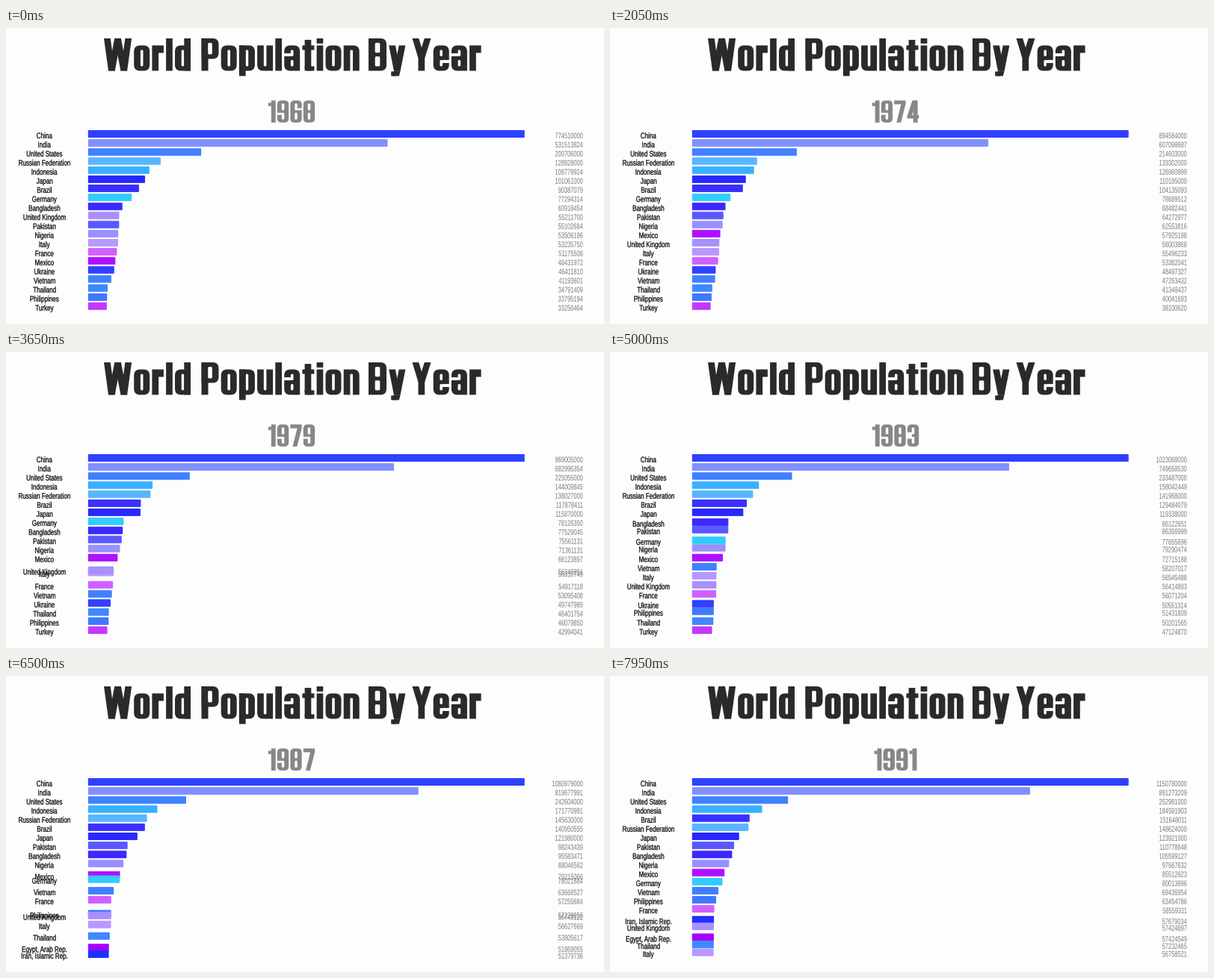
Animation of 800 by 397 pixels, one loop 8 s. Source, as a matplotlib script:

```python
import numpy as np
import matplotlib.pyplot as plt
from matplotlib.animation import FuncAnimation
from matplotlib.patches import PathPatch
from matplotlib.path import Path
from matplotlib.textpath import TextPath
from matplotlib.transforms import Affine2D

WIDTH, HEIGHT, DPI = 800, 397, 100
STEP, FRAMES = 50, 160
TICK, EASE = 351, 305              # ms per year, ms of movement in it
YEARS, ROWS = np.arange(1968, 1992), 20
BAR_X, BAR_Y, BAR_W, BAR_H, PITCH = 109.8, 137, 584, 10.1, 12.16
PAPER, DARK, GREY = "#fdfdfe", "#2a2a2a", "#878787"

fig = plt.figure(figsize=(WIDTH / DPI, HEIGHT / DPI), dpi=DPI, facecolor=PAPER)
ax = fig.add_axes([0, 0, 1, 1])
ax.set(xlim=(0, WIDTH), ylim=(HEIGHT, 0))
ax.axis("off")


# ---------- shapes ----------
def slab(x0, y0, x1, y1, r=0):
    """Rectangle with corner radii (top left, top right, bottom right, bottom left)."""
    a, b, c, d = r if isinstance(r, tuple) else (r,) * 4
    pts = [(x0, y1 - a), (x0, y1), (x0 + a, y1),
           (x1 - b, y1), (x1, y1), (x1, y1 - b),
           (x1, y0 + c), (x1, y0), (x1 - c, y0),
           (x0 + d, y0), (x0, y0), (x0, y0 + d), (x0, y1 - a)]
    corner = [Path.LINETO, Path.CURVE3, Path.CURVE3]
    codes = [Path.MOVETO] + corner[1:] + corner * 3 + [Path.CLOSEPOLY]
    return Path(pts, codes)


def add(path, color, edge=0):
    return ax.add_patch(PathPatch(path, fc=color, ec=color, lw=edge))


# ---------- heavy condensed lettering ----------
C, X, D = 43.5, 34, -7             # cap height, x-height, descender
S, W, N = 8.7, 21, 22.5            # stem, letter width, numeral width
T, GAP = 6, 3.2                    # thickness of the bows, letter spacing


def ink(*args):
    return slab(*args), True


def cut(*args):
    return slab(*args), False


def slant(x0, y0, x1, y1, s=S):
    pts = [(x0, y0), (x0 + s, y0), (x1 + s, y1), (x1, y1), (x0, y0)]
    return Path(pts, closed=True), True


def bowl(w, h, segs, square="", y0=0, gap=4):
    """Rounded block opened up like a seven-segment figure.

    a top, b/c right, d bottom, e/f left, g middle; square lists unrounded corners.
    """
    mid, half = y0 + h / 2, 2.5
    low = y0 + T if "d" in segs else y0 - 1
    high = y0 + h - T if "a" in segs else y0 + h + 1
    radii = tuple(8 * (bow in segs and str(i) not in square) for i, bow in enumerate("aadd"))
    holes = [(low, mid - half), (mid + half, high)] if "g" in segs else [(low, high)]
    parts = [ink(0, y0, w, y0 + h, radii)]
    parts += [cut(S, b, w - S, t, 1.7) for b, t in holes]
    for upper, lower, x in (("f", "e", -1), ("b", "c", w - S - .3)):
        top = mid + half + gap if upper not in segs else mid - half
        bottom = mid - half - gap if lower not in segs else mid + half
        if top > bottom:
            parts.append(cut(x, bottom, x + S + 1.3, top))
    return parts


def zigzag(xs, s=S):
    ends = [C, 0] * len(xs)
    return [slant(p, ends[i], q, ends[i + 1], s) for i, (p, q) in enumerate(zip(xs, xs[1:]))]


GLYPHS = {
    "W": (37, zigzag([0, 6, 14.2, 22.4, 28.4])),
    "P": (23, [ink(0, 0, 9, C)] + bowl(23, C - 16, "abcdef", "03", 16)),
    "B": (24, bowl(24, C, "abcdefg", "03")),
    "Y": (25, [slant(0, C, 8, 17), slant(16.3, C, 8, 17), ink(8, 0, 8 + S, 18)]),
    "o": (W, bowl(W, X, "abcdef")),
    "n": (W, bowl(W, X, "abcef", "03")),
    "u": (W, bowl(W, X, "bcdef", "12")),
    "d": (W, bowl(W, X, "abcdef", "12") + [ink(W - S, 0, W, C)]),
    "p": (W, bowl(W, X, "abcdef", "03") + [ink(0, D, S, X)]),
    "a": (W, bowl(W, X, "abcdeg", "2")),
    "e": (W, bowl(W, X, "abdefg")),
    "l": (S, [ink(0, 0, S, C)]),
    "i": (S, [ink(0, 0, S, X), ink(0, X + 2.6, S, C)]),
    "r": (15.5, [ink(0, 0, S, X), ink(S - 1, X - 10, 15.5, X)]),
    "t": (16, [ink(3.2, 0, 3.2 + S, C - 2), ink(0, X - T, 16, X),
               ink(3.2, 0, 16, T, (0, 0, 0, 5))]),
    "y": (22, [slant(0, X, 6.7, 0), slant(13.5, X, 6.7, 0), slant(6.7, 0, 5, D),
               ink(3, D, 10, -1)]),
    "1": (14.5, [ink(5.8, 0, 14.5, C), ink(0, C - 11, 6, C - 4.5)]),
    "4": (23, [ink(11.8, 0, 11.8 + S, C), ink(0, 8, 23, 14.5), slant(0, 13, 10, C)]),
    "7": (N, [ink(0, C - 7.5, N, C), slant(4.5, 0, N - S, C - 7)]),
    "5": (N, bowl(N, C, "acdfg", "01", gap=10)),
}
for digit, segs in zip("023689", "abcdef abdeg abcdg acdefg abcdefg abcdfg".split()):
    GLYPHS[digit] = N, bowl(N, C, segs)


def span(text):
    return sum(GLYPHS[c][0] + GAP for c in text) - GAP


def letter(text, x, base, color, size=1.0):
    patches = []
    for c in text:
        w, parts = GLYPHS[c]
        place = Affine2D().scale(size, -size).translate(x, base)
        patches += [add(p.transformed(place), color if solid else PAPER) for p, solid in parts]
        x += (w + GAP) * size
    return patches


# ---------- small condensed text ----------
def small_text(text, x, align, condense):
    path = TextPath((0, 0), text, size=10.8, prop={"family": "Liberation Sans"})
    path = path.transformed(Affine2D().scale(condense, -1))
    box = path.get_extents()
    return path.transformed(Affine2D().translate(x - box.x0 - align * box.width, 0))


def shifted(path, y):
    return Path(path.vertices + [0, y], path.codes)


# ---------- data: a cubic through four census years ----------
CENSUS = np.array([1968, 1979, 1985, 1991])


def growth(points):
    cubic = np.polyfit((CENSUS - 1980) / 12, points, 3)
    rounding = -3 if all(p % 1000 == 0 for p in points) else 0
    return np.round(np.polyval(cubic, (YEARS - 1980) / 12), rounding)


class Nation:
    everyone = []

    def __init__(self, name, color, *points):
        self.values = growth(points)
        self.label = small_text(name, 51.5, .5, .745)
        self.figures = {}
        blank = slab(0, 0, 0, 0)
        self.bar = add(blank, color)
        self.tag = add(blank, "#0c0c0c", .2)
        self.count = add(blank, "#7c7c7c")
        Nation.everyone.append(self)

    def show(self, on):
        for p in (self.bar, self.tag, self.count):
            p.set_visible(on)

    def figure(self, n):
        if n not in self.figures:
            self.figures[n] = small_text(str(int(self.values[n])), 771.5, 1, .69)
        return self.figures[n]

    def draw(self, n, row, width, rank):
        y = BAR_Y + PITCH * row
        self.bar.set_path(slab(BAR_X, y, BAR_X + width, y + BAR_H, 1))
        self.tag.set_path(shifted(self.label, y + 11))
        self.count.set_path(shifted(self.figure(n), y + 11))
        self.bar.set_zorder(10 + rank)
        self.tag.set_zorder(50 + rank)
        self.count.set_zorder(50 + rank)


Nation("China", "#3040ff", 774510000, 969005000, 1051040000, 1150780000)
Nation("India", "#8090ff", 531513824, 682995354, 784360008, 891273209)
Nation("United States", "#4080ff", 200706000, 225055000, 237924000, 252981000)
Nation("Russian Federation", "#58b6ff", 128928000, 138027000, 143858000, 148624000)
Nation("Indonesia", "#38b0ff", 108779924, 144009845, 164982451, 184591903)
Nation("Japan", "#2828ff", 101061000, 115870000, 120754000, 123921000)
Nation("Brazil", "#3a30ff", 90387079, 117878411, 135274080, 151648011)
Nation("Germany", "#30ccff", 77294314, 78126350, 77684873, 80013896)
Nation("Bangladesh", "#3a28ff", 60918454, 77529045, 90764183, 105599127)
Nation("United Kingdom", "#a890ff", 55211700, 56246951, 56550268, 57424897)
Nation("Pakistan", "#5a58ff", 55102684, 75561131, 92191510, 110778648)
Nation("Nigeria", "#9890ff", 53506196, 71361131, 83562785, 97667632)
Nation("Italy", "#b898ff", 53235750, 56310749, 56593071, 56758521)
Nation("France", "#d060ff", 51175508, 54917118, 56654098, 58559311)
Nation("Mexico", "#b010ff", 48431972, 66123897, 75983485, 85512623)
Nation("Ukraine", "#3040ff", 46411810, 49747989, 50917000, 52000000)
Nation("Vietnam", "#4080ff", 41193601, 53095408, 60896721, 69436954)
Nation("Thailand", "#4088ff", 34791409, 46401754, 52026901, 57232465)
Nation("Philippines", "#4078ff", 33795194, 46079850, 54275822, 63454786)
Nation("Turkey", "#c438ff", 33256464, 42994041, 49178079, 54921300)
Nation("Egypt, Arab Rep.", "#a400ff", 32900000, 42200000, 49258732, 57424549)
Nation("Iran, Islamic Rep.", "#2030ff", 27200000, 37000000, 47800000, 57679034)

NATIONS = Nation.everyone
TABLE = np.array([nation.values for nation in NATIONS])
RANK = np.argsort(np.argsort(-TABLE, axis=0), axis=0)
BARS = BAR_W * TABLE / TABLE.max(axis=0)

for word, x in (("World", 131), ("Population", 261.5), ("By", 485), ("Year", 543.5)):
    letter(word, x, 57.4, DARK)

YEAR_SIZE = .68
year_art = [letter(str(y), 382 - span(str(y)) * YEAR_SIZE / 2, 126.8, GREY, YEAR_SIZE)
            for y in YEARS]


def ease(u):
    u = min(max(u, 0), 1)
    return 4 * u ** 3 if u < .5 else 1 - 4 * (1 - u) ** 3


def update(frame):
    turn, elapsed = divmod(frame * STEP - 1, TICK)
    n = min(turn + 1, len(YEARS) - 1)
    k = ease(elapsed / EASE)
    for i, patches in enumerate(year_art):
        for p in patches:
            p.set_visible(i == n)
    for j, nation in enumerate(NATIONS):
        rank = RANK[j, n]
        nation.show(rank < ROWS)
        if rank < ROWS:
            # newcomers appear directly in their row
            m = n - 1 if n and RANK[j, n - 1] < ROWS else n
            row = RANK[j, m] + (rank - RANK[j, m]) * k
            width = BARS[j, m] + (BARS[j, n] - BARS[j, m]) * k
            nation.draw(n, row, width, rank)
    return []


anim = FuncAnimation(fig, update, frames=FRAMES, interval=STEP, repeat=True,
                     repeat_delay=0, blit=False)
plt.show()
```
